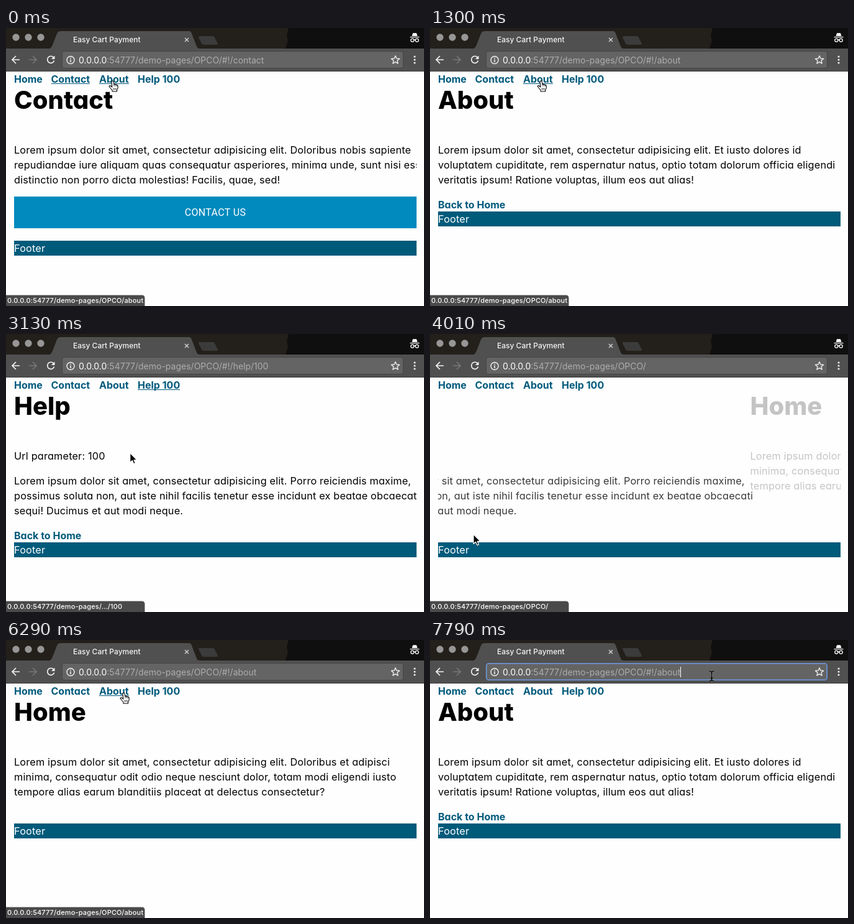
Recreate the animation shown at these times as an HTML page. Size 673 by 447 pixels, loop 8000 ms.

```html
<!DOCTYPE html>
<html lang="en">
<head>
<meta charset="utf-8">
<title>Page transitions</title>
<style>
html, body { margin: 0; width: 100%; height: 100%; overflow: hidden; background: #fefefe; }
body { font: 16px/24px Inter, "Open Sans", sans-serif; font-feature-settings: "cv11"; color: #000; }
#stage { position: absolute; left: 0; top: 0; width: 673px; height: 447px; overflow: hidden; white-space: nowrap; }
#stage > *, .page, .page > *, nav a { position: absolute; }
svg { display: block; overflow: visible; }

.tab, .url, .status { font-feature-settings: normal; }
.tab { left: 108px; top: 10px; font-size: 12px; line-height: 18px; font-weight: 500; color: #f4f4f4; }
.url { left: 117px; top: 40px; font-size: 14px; line-height: 23px; color: #adadad; }
.url b { font-weight: 400; color: #fff; }
.url span { display: inline-block; }
.url.picked span { background: #4a76b8; color: #fff; }
.ring { left: 90px; top: 37px; width: 550px; height: 28px; box-sizing: border-box;
  border: 1px solid #6f9be0; box-shadow: inset 0 0 0 1px #6780ab; border-radius: 4px; }
.caret { display: none; width: 1px; height: 17px; background: #fff; position: absolute; right: -1px; top: 3px; }

nav { left: 0; top: 70px; }
nav a, .back { font-weight: 700; color: #005a7c; }
nav a.on::after { content: ""; position: absolute; left: 0; right: 0; top: 19px; height: 1px; background: #005a7c; }

.view { left: 13px; top: 94px; width: 648px; height: 353px; overflow: hidden; }
.page { left: 0; top: 0; width: 648px; height: 353px; }
.page > * { left: 0; margin: 0; }
h1 { top: 2px; font-size: 40px; line-height: 40px; font-weight: 800; }
p, .footer { font-size: 16.3px; letter-spacing: .16px; }
.button { top: 177px; width: 648px; height: 51px; background: #008abe; color: #fff;
  font: 400 16px/51px Roboto, sans-serif; letter-spacing: .35px; text-align: center; }
.footer { left: 13px; width: 648px; height: 24px; background: #005a7a; color: #fff; }

.status { left: 0; top: 430px; width: 223px; height: 17px; background: #4a4a4a; color: #fff;
  border-radius: 0 4px 0 0; box-shadow: 0 0 0 .7px #8a8a8a; font-size: 11px; line-height: 17px; font-weight: 500;
  letter-spacing: .15px; text-indent: 2px; }
#cursor { left: 0; top: 0; }
</style>
</head>
<body>
<div id="stage">
  <svg width="673" height="70" fill="none">
    <path fill="#0f0f0f" d="M0 0H673V33H0Z"/>
    <path fill="#231f1a" d="M0 0H455L452 12L454 20L450 33H0Z"/>
    <path fill="#505050" d="M0 33H70C73 32 74 29 75 27L82 9Q84 5 88 5H294Q298 5 299 9L306 27C307 30 308 33 312 33H673V70H0Z"/>
    <path stroke="#3c3c3c" d="M0 69.5H673"/>
    <path fill="#3b3b3b" d="M312 13H333Q335 13 336 15L341 25Q341 27 339 27H319Q316 27 315 25L310 15Q310 13 312 13Z"/>
    <g fill="#969696"><circle cx="16" cy="15" r="5.7"/><circle cx="36" cy="15" r="5.7"/><circle cx="56" cy="15" r="5.7"/></g>
    <path stroke="#d8d8d8" stroke-width="1.3" d="M288 16l6 6M294 16l-6 6"/>
    <rect x="90.5" y="37.5" width="549" height="27" rx="3.5" fill="#646464" stroke="#454545"/>
    <g stroke="#f2f2f2" stroke-width="1.7">
      <path d="M22 51H10.500M16 45l-6 6l6 6"/>
      <path stroke="#787878" d="M37 51H48.500M43 45l6 6l-6 6"/>
      <path d="M76.600 47.300A5.600 5.600 0 1 0 77.600 52.500"/>
      <circle cx="104" cy="51.500" r="6" stroke-width="1.4"/>
      <path d="M104 50.500V55M104 47.700V49.300" stroke-width="1.5"/>
      <path stroke-width="1.3" stroke-linejoin="round" d="M627 44.700l1.900 4.300l4.700.4l-3.600 3.100l1.100 4.600l-4.100-2.500l-4.100 2.500l1.100-4.600l-3.600-3.100l4.700-.4Z"/>
    </g>
    <path fill="#f2f2f2" d="M78.500 44.500V50H73Z"/>
    <g fill="#e8e8e8"><circle cx="658" cy="46" r="1.600"/><circle cx="658" cy="51" r="1.600"/><circle cx="658" cy="56" r="1.600"/></g>
    <path fill="#fff" d="M653.500 13L655 8.500Q656 7.500 658 8.200Q660 7.500 661 8.500L662.500 13ZM650.500 14H665.500V15.300H650.500Z"/>
    <path stroke="#fff" stroke-width="1.300" d="M656.800 19.500Q658 18.500 659.200 19.500"/>
    <circle cx="654.300" cy="19.700" r="2.500" stroke="#fff" stroke-width="1.300"/>
    <circle cx="661.700" cy="19.700" r="2.500" stroke="#fff" stroke-width="1.300"/>
  </svg>
  <div class="tab">Easy Cart Payment</div>
  <div class="ring"></div>
  <div class="url"><span><b>0.0.0.0</b>:54777/demo-pages/OPCO/<i style="font-style:normal"></i></span><div class="caret"></div></div>

  <nav>
    <a style="left:13px">Home</a>
    <a style="left:72.500px">Contact</a>
    <a style="left:150px">About</a>
    <a style="left:212px">Help 100</a>
  </nav>

  <div class="view">
    <div class="page" id="home">
      <h1>Home</h1>
      <p style="top:90px">Lorem ipsum dolor sit amet, consectetur adipisicing elit. Doloribus et adipisci<br>minima, consequatur odit odio neque nesciunt dolor, totam modi eligendi iusto<br>tempore alias earum blanditiis placeat at delectus consectetur?</p>
    </div>
    <div class="page" id="contact">
      <h1>Contact</h1>
      <p style="top:90px">Lorem ipsum dolor sit amet, consectetur adipisicing elit. Doloribus nobis sapiente<br>repudiandae iure aliquam quas consequatur asperiores, minima unde, sunt nisi esse<br>distinctio non porro dicta molestias! Facilis, quae, sed!</p>
      <div class="button">CONTACT US</div>
    </div>
    <div class="page" id="about">
      <h1>About</h1>
      <p style="top:90px">Lorem ipsum dolor sit amet, consectetur adipisicing elit. Et iusto dolores id<br>voluptatem cupiditate, rem aspernatur natus, optio totam dolorum officia eligendi<br>veritatis ipsum! Ratione voluptas, illum eos aut alias!</p>
      <a class="back" style="top:178px">Back to Home</a>
    </div>
    <div class="page" id="help">
      <h1>Help</h1>
      <p style="top:90px">Url parameter: 100</p>
      <p style="top:130px">Lorem ipsum dolor sit amet, consectetur adipisicing elit. Porro reiciendis maxime,<br>possimus soluta non, aut iste nihil facilis tenetur esse incidunt ex beatae obcaecati<br>sequi! Ducimus et aut modi neque.</p>
      <a class="back" style="top:218px">Back to Home</a>
    </div>
  </div>
  <div class="footer">Footer</div>
  <div class="status"></div>

  <svg id="cursor" width="1" height="1" stroke-linejoin="round">
    <g id="hand" transform="translate(-1.5 -1)">
      <path fill="#fff" stroke="#000" stroke-width="1.100" d="M-1.500 1Q0-1 1.500 1L2.300 5.500Q3.500 4.600 4.500 6Q6 5.200 6.800 6.700Q8.500 6.200 8.700 8.500L8.500 12L7 14.500V17H-.500V15L-3.500 11.500L-5.500 8.700Q-5.200 7 -3 8L-.700 10Z"/>
      <path fill="none" stroke="#000" stroke-width=".8" d="M2.300 5.500V8.500M4.500 6.200V8.700M6.800 7V9M1.500 11.500V14.500M3.500 11.500V14.500M5.500 11.500V14.500"/>
    </g>
    <path id="arrow" fill="#000" stroke="#fff" stroke-width="1.200" d="M0 0V15.500L3.600 12.200L6 17.600L8.500 16.500L6.200 11.300H11Z"/>
    <g id="beam" fill="none" transform="translate(.5 0)">
      <path stroke="#a0a0a0" stroke-width="2.600" d="M-4-8Q0-8 0-5Q0-8 4-8M0-5V5M-4 8Q0 8 0 5Q0 8 4 8M-2 3H2"/>
      <path stroke="#000" stroke-width="1.600" d="M-4-8Q0-8 0-5Q0-8 4-8M0-5V5M-4 8Q0 8 0 5Q0 8 4 8M-2 3H2"/>
    </g>
  </svg>
</div>
<script>
const LOOP = 8000, WIDTH = 648, DELAY = 60, SLIDE = 570;
const $ = s => document.querySelector(s);
const links = [...document.querySelectorAll('nav a')];
const spans = [[13, 59], [72, 137], [150, 199], [212, 281]];
const footerTop = { home: 255, contact: 342, about: 295, help: 335 };
const hash = { home: '', contact: '#!/contact', about: '#!/about', help: '#!/help/100' };
const visits = [[0, 'contact'], [390, 'about'], [2480, 'help'], [3760, 'home'], [6290, 'about']];
const focus = [[0, 1], [240, 2], [2240, 3], [3720, -1], [6230, 2], [7330, -1]];
const base = '0.0.0.0:54777/demo-pages/';
const hints = [[0, 'OPCO/about'], [1510, '…/100'], [3520, 'OPCO/'], [5200, 'OPCO/about']];
const hintAlpha = [[0, 1], [3250, 1], [3450, 0], [3580, 0], [3700, 1], [4480, 1], [4730, 0],
  [5750, 0], [5990, 1], [7120, 1], [7370, 0]];
const path = [[0, 173, 86], [1240, 173, 86], [1300, 180, 86], [1650, 233, 86], [2980, 233, 86],
  [3130, 200, 191], [3660, 70, 322], [4200, 70, 322], [4600, 424, 44], [4830, 421, 44],
  [5120, 421, 44], [5700, 198, 72], [5870, 191, 86], [6900, 191, 86], [7020, 215, 68],
  [7330, 428, 52], [7570, 430, 52], [7790, 453, 58]];

const indexAt = (list, t) => list.findLastIndex(k => k[0] <= t);
const stepAt = (list, t) => list[indexAt(list, t)][1];
const clamp = v => Math.max(0, Math.min(1, v));
const ease = u => u < .5 ? 2 * u * u : 1 - 2 * (1 - u) ** 2;

function tween(keys, t, col = 1) {
  const i = indexAt(keys, t), a = keys[i], b = keys[i + 1];
  return b ? a[col] + (b[col] - a[col]) * (t - a[0]) / (b[0] - a[0]) : a[col];
}

function place(id, x, alpha) {
  const s = $('#' + id).style;
  s.display = 'block';
  s.transform = `translateX(${x}px)`;
  s.opacity = alpha;
}

function drawPages(t) {
  const i = indexAt(visits, t), [start, now] = visits[i];
  const sliding = i > 0 && t < start + DELAY + SLIDE;
  document.querySelectorAll('.page').forEach(p => p.style.display = 'none');
  let top = footerTop[now];
  if (sliding) {
    const prev = visits[i - 1][1], p = ease(clamp((t - start - DELAY) / SLIDE));
    place(prev, -WIDTH * p, 1 - p);
    place(now, WIDTH * (1 - p), p);
    top = Math.max(top, footerTop[prev]);
  } else place(now, 0, 1);
  $('.footer').style.top = top + 'px';
  $('.url i').textContent = hash[now];
}

function drawCursor(t) {
  const x = tween(path, t, 1), y = tween(path, t, 2);
  const over = y >= 72 && y < 94 ? spans.findIndex(([a, b]) => x >= a && x <= b) : -1;
  const onBack = t > 3560 && t < 3900;
  const kind = y > 36 && y < 65 && x > 90 && x < 640 ? 'beam' : over >= 0 || onBack ? 'hand' : 'arrow';
  for (const k of ['beam', 'hand', 'arrow']) $('#' + k).style.display = k === kind ? 'inline' : 'none';
  $('#cursor').style.transform = `translate(${x}px,${y}px)`;
  links.forEach((a, i) => a.classList.toggle('on', i === over || i === stepAt(focus, t)));
}

function draw(t) {
  drawPages(t);
  drawCursor(t);
  $('.status').textContent = base + stepAt(hints, t);
  $('.status').style.opacity = tween(hintAlpha, t);
  $('.ring').style.display = t >= 7330 ? 'block' : 'none';
  $('.url').classList.toggle('picked', t >= 7330 && t < 7690);
  $('.caret').style.display = t >= 7690 ? 'block' : 'none';
}

function frame() {
  draw(performance.now() % LOOP);
  requestAnimationFrame(frame);
}
frame();
</script>
</body>
</html>
```
